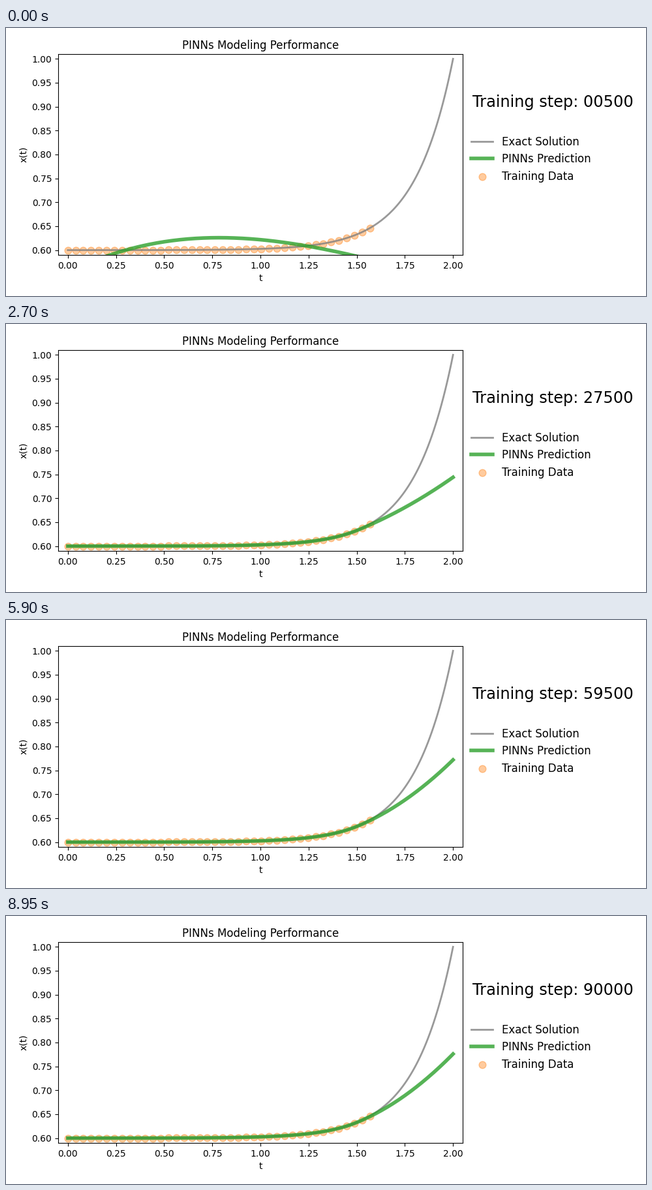
Recreate the animation shown at these times as a matplotlib script. Size 981x411 px, loop 9 s.

```python
import numpy as np
import matplotlib.pyplot as plt
from matplotlib.animation import FuncAnimation

W, H, DPI = 981, 411, 100
FRAMES, INTERVAL = 180, 50
T_JOIN = 1.5      # where the prediction starts to leave the exact curve
STEP_FIT = 9500   # step at which the rough fit is reached


def exact(t):
    return 0.6 + 0.4 * np.exp(5 * (t - 2))


def extrapolated(t, end):
    """Exact curve up to T_JOIN, then a parabola that reaches `end` at t = 2."""
    start = exact(T_JOIN)
    slope = 5 * (start - 0.6)
    span = 2 - T_JOIN
    bend = (end - start - slope * span) / span**2
    d = t - T_JOIN
    return np.where(d < 0, exact(t), start + slope * d + bend * d**2)


def end_value(step):
    """Predicted value at t = 2, closing in on its limit."""
    steps = [9500, 27500, 39000, 59500, 70500, 90000]
    gaps = [0.118, 0.033, 0.0135, 0.005, 0.003, 0.001]
    return 0.777 - np.exp(np.interp(step, steps, np.log(gaps)))


t = np.linspace(0, 2, 200)
d = t - 0.785
first = 0.626 - 0.0965 * d**2 + 0.0289 * d**3

knots = [0, 0.25, 0.5, 0.75, 1.0, 1.25, 1.5, 1.75, 2.0]
values = [0.599, 0.6012, 0.5992, 0.5983, 0.6027, 0.6135, 0.629, 0.645, 0.659]
rough = np.polyval(np.polyfit(knots, values, 6), t)
misfit = rough - extrapolated(t, end_value(STEP_FIT))


def prediction(step):
    if step <= STEP_FIT:
        last = np.exp(-(STEP_FIT - 500) / 2500)
        w = (np.exp(-(step - 500) / 2500) - last) / (1 - last)
        return rough + (first - rough) * w
    decay = np.exp(-(step - STEP_FIT) / 4500)
    return extrapolated(t, end_value(step)) + misfit * decay


plt.rcParams["font.family"] = "DejaVu Sans"
fig = plt.figure(figsize=(W / DPI, H / DPI), dpi=DPI, facecolor="white")
ax = fig.add_axes([80 / W, 63 / H, 620 / W, 308 / H])
ax.set_xlim(-0.05, 2.05)
ax.set_ylim(0.59, 1.01)
ax.set_title("PINNs Modeling Performance")
ax.set_xlabel("t")
ax.set_ylabel("x(t)")

ax.plot(t, exact(t), color="grey", lw=2, alpha=0.8, label="Exact Solution")
line, = ax.plot(t, first, color="tab:green", lw=4, alpha=0.8,
                label="PINNs Prediction")
t_data = t[0:160:4]
ax.scatter(t_data, exact(t_data), s=60, color="tab:orange", alpha=0.4,
           label="Training Data")
ax.legend(loc=(1.01, 0.34), frameon=False, fontsize="large")
counter = ax.text(2.1, 0.9, "", fontsize="xx-large", color="k")


def update(i):
    step = 500 * (i + 1)
    line.set_ydata(prediction(step))
    counter.set_text(f"Training step: {step:05d}")
    return line, counter


anim = FuncAnimation(fig, update, frames=FRAMES, interval=INTERVAL,
                     repeat=True, repeat_delay=0)
plt.show()
```
